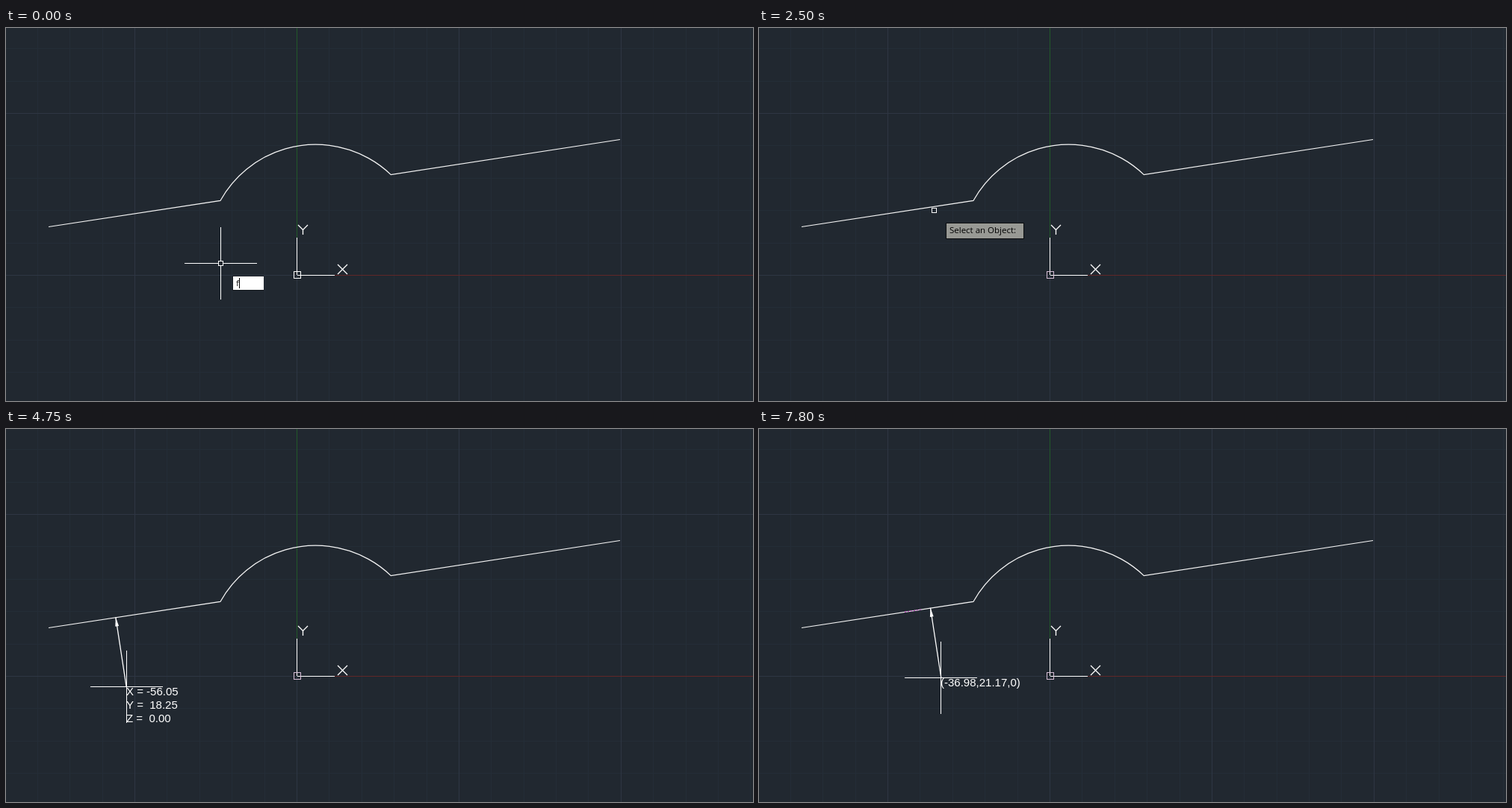
Animation, 1000 px wide and 500 px high, one loop 8 s. Source, as an HTML page with a canvas:

```html
<!DOCTYPE html>
<html lang="en">
<head>
<meta charset="utf-8">
<title>Coordinate leader</title>
<style>
html, body { margin: 0; width: 100%; height: 100%; overflow: hidden; background: #212830; }
canvas { display: block; width: 100vw; height: 100vh; }
</style>
</head>
<body>
<canvas id="stage" width="1000" height="500"></canvas>
<script>
const ctx = document.getElementById('stage').getContext('2d');
const LOOP = 8000, STEP = 50;
const UI = '11.5px "Open Sans", "Noto Sans", sans-serif';
const LABEL = '15px "Liberation Sans", Arial, sans-serif';
const WHITE = '#fff';
const TYPED = 'fcoords';

// World units: screen scale and origin, and the straight left part of the curve
const S = 4.333, OX = 389.7, OY = 331.5;
const X0 = -64.62, Y0 = 16.942, K = 0.1531;

// Cursor moves: start time, end time, x, y, softness; it rests in between
const HOME = { x: 287.5, y: 315.9 };
const MOVES = [
  [1750, 2600, 232.5, 241.5, 1],
  [3150, 4000, 122.93, 344.5],
  [4000, 4150, 111.5, 350.5],
  [4350, 5050, 195.6, 341.2],
  [5900, 5950, 185.88, 345.5],
  [5950, 6500, 117.5, 366.5],
  [6650, 6800, 155.87, 350.5],
  [6800, 7300, 243.82, 333.5]
];

function cursorAt(t) {
  let { x, y } = HOME;
  for (const [from, to, tx, ty, soft = 0.5] of MOVES) {
    const p = Math.min(1, Math.max(0, (t - from) / (to - from)));
    const e = p + soft * (p * p * (3 - 2 * p) - p);
    x += (tx - x) * e;
    y += (ty - y) * e;
  }
  return { x, y };
}

function rect(x, y, w, h, color) {
  ctx.fillStyle = color;
  ctx.fillRect(x, y, w, h);
}

function frame(x, y, w, h, color) {
  ctx.strokeStyle = color;
  ctx.lineWidth = 1;
  ctx.strokeRect(x + 0.5, y + 0.5, w - 1, h - 1);
}

function line(x1, y1, x2, y2, color = WHITE, width = 1.3) {
  ctx.strokeStyle = color;
  ctx.lineWidth = width;
  ctx.beginPath();
  ctx.moveTo(x1, y1);
  ctx.lineTo(x2, y2);
  ctx.stroke();
}

function text(str, x, y, font, color) {
  ctx.font = font;
  ctx.fillStyle = color;
  ctx.fillText(str, x, y);
}

function drawGrid() {
  rect(0, 0, 1000, 500, '#212830');
  for (const major of [false, true]) {
    const color = major ? '#2e3643' : '#242d37';
    for (let k = -9; k <= 14; k++) {
      if ((k % 5 === 0) !== major) continue;
      const d = Math.round(43.38 * k);
      rect(389 + d, 0, 1, 500, color);
      rect(0, 331 + d, 1000, 1, color);
    }
  }
  rect(389, 0, 1, 331, '#225929');
  rect(390, 331, 610, 1, '#612627');
}

function drawOrigin(t) {
  rect(389, 281, 1, 50, WHITE);
  rect(390, 331, 50, 1, WHITE);
  frame(385, 326, 10, 10, t < 1900 ? WHITE : '#d5bdd5');
  line(391, 264, 397.5, 270.5);
  line(404, 264, 397.5, 270.5);
  line(397.5, 270, 397.5, 277);
  line(444, 317, 457, 330);
  line(457, 317, 444, 330);
}

// Line, circular arc, line
function strokeCurve(color, width) {
  const cx = 414.5, cy = 302;
  ctx.strokeStyle = color;
  ctx.lineWidth = width;
  ctx.beginPath();
  ctx.moveTo(57, 266.5);
  ctx.arc(cx, cy, 145.8, Math.atan2(231.5 - cy, 287 - cx), Math.atan2(196.3 - cy, 515.5 - cx));
  ctx.lineTo(822, 149.5);
  ctx.stroke();
}

function drawCurve(t) {
  if (t >= 2650 && t < 2950) strokeCurve('rgba(150,165,180,0.55)', 4);
  strokeCurve('#f4f4f4', 1.25);
  if (t >= 4800) {
    ctx.setLineDash([2, 2]);
    line(195, 245.3, 218, 241.9, '#c452c4');
    ctx.setLineDash([]);
  }
}

function drawPick(c, color) {
  frame(Math.floor(c.x) - 3, Math.floor(c.y) - 3, 7, 7, color);
}

function drawCross(c, gap) {
  const x = Math.floor(c.x), y = Math.floor(c.y), arm = 49 - gap;
  rect(x - 48, y, arm, 1, WHITE);
  rect(x + gap, y, arm, 1, WHITE);
  rect(x, y - 48, 1, arm, WHITE);
  rect(x, y + gap, 1, arm, WHITE);
}

function drawInput(t) {
  const word = TYPED.slice(0, 1 + Math.max(0, Math.floor((t + 20) / 70)));
  ctx.font = UI;
  const w = ctx.measureText(word).width;
  const boxW = Math.max(42, Math.ceil(w) + 11);
  rect(303, 332, boxW, 20, '#15191e');
  rect(304, 333, boxW - 1, 18, WHITE);
  text(word, 308, 346, UI, '#111');
  rect(Math.round(308 + w), 335, 1, 14, '#000');
  if (t >= 700) {
    rect(303, 352, 120, 20, '#6f7479');
    rect(304, 353, 118, 18, '#e6e8ea');
    text(TYPED.toUpperCase(), 326, 366, UI, '#111');
  }
}

function drawPrompt(c) {
  const x = Math.floor(c.x + 16.2), y = Math.floor(c.y) + 17;
  rect(x, y, 105, 22, '#0c0e10');
  rect(x + 1, y + 1, 103, 20, '#989994');
  text('Select an Object:', x + 5, y + 14, UI, '#000');
}

// Foot of the perpendicular from the cursor, in world units
function footOf(c) {
  const dx = (c.x - OX) / S - X0, dy = (OY - c.y) / S - Y0;
  const u = (dx + dy * K) / (1 + K * K);
  return { X: X0 + u, Y: Y0 + u * K };
}

function drawLeader(c, t) {
  const { X, Y } = footOf(c);
  const fx = OX + S * X, fy = OY - S * Y;
  const dx = c.x - fx, dy = c.y - fy, len = Math.hypot(dx, dy);
  if (len > 22) {
    const ux = dx / len, uy = dy / len;
    line(fx, fy, c.x, c.y);
    ctx.fillStyle = WHITE;
    ctx.beginPath();
    ctx.moveTo(fx, fy);
    ctx.lineTo(fx + ux * 12 - uy * 2.4, fy + uy * 12 + ux * 2.4);
    ctx.lineTo(fx + ux * 12 + uy * 2.4, fy + uy * 12 - ux * 2.4);
    ctx.fill();
  }
  const xs = X.toFixed(2), ys = Y.toFixed(2);
  let rows = ['X = ' + xs, 'Y =  ' + ys, 'Z =  0.00'];
  if (t >= 7800) rows = [`(${xs},${ys},0)`];
  else if (t >= 5500) rows.pop();
  const left = Math.floor(c.x), top = Math.floor(c.y) + 12;
  rows.forEach((row, i) => text(row, left, top + 18 * i, LABEL, WHITE));
}

function draw(t) {
  const c = cursorAt(t);
  drawGrid();
  drawOrigin(t);
  drawCurve(t);
  if (t < 1250) {
    drawCross(c, 4);
    drawPick(c, WHITE);
    drawInput(t);
  } else if (t < 2950) {
    drawPick(c, t < 1850 ? '#ff5cff' : WHITE);
    if (t >= 1300 && t < 2800) drawPrompt(c);
  } else if (t >= 3050) {
    // The leader trails the pointer by one step on the last sweep
    const trail = t > 6650 ? STEP : 0;
    drawLeader(cursorAt(t - trail), t);
    drawCross(c, 0);
  }
}

const start = performance.now();
function tick() {
  const t = (performance.now() - start) % LOOP;
  draw(Math.floor(t / STEP) * STEP);
  requestAnimationFrame(tick);
}
tick();
</script>
</body>
</html>
```
